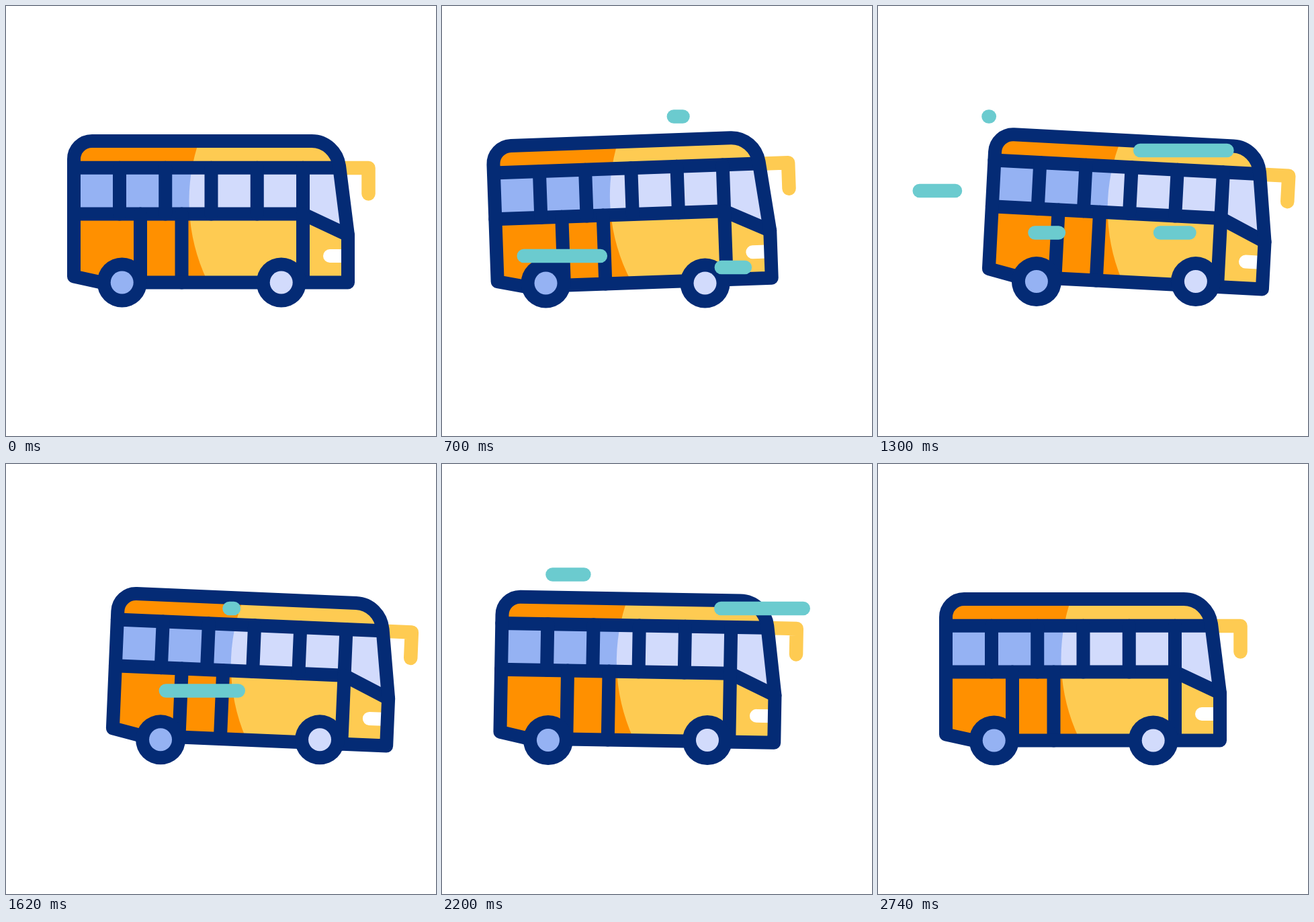
These frames come from a looping animation (640x640 px, 2.8 s). An HTML page with a canvas:

```html
<!DOCTYPE html>
<html lang="en">
<head>
<meta charset="utf-8">
<title>Bus</title>
<style>
  html, body { margin: 0; width: 100%; height: 100%; overflow: hidden; background: #fff; }
  canvas { display: block; width: 640px; height: 640px; }
</style>
</head>
<body>
<canvas id="stage" width="640" height="640"></canvas>
<script>
const ctx = document.getElementById('stage').getContext('2d');
const LOOP = 2800, REST = 200, STOP = 2740;
const NAVY = '#042b75', ORANGE = '#ff9000', YELLOW = '#fecb52';
const BLUE = '#95b2f3', PALE = '#d2dbfc', TEAL = '#6bcbcf';
const PIVOT = { x: 319, y: 411 };
const STREAK_TIME = 500, TAIL_LAG = 205;

// Eased progress from 0 to 1 between two times
function step(t, start, end) {
  const u = Math.min(1, Math.max(0, (t - start) / (end - start)));
  return u * u * (3 - 2 * u);
}

// Wind up, dash forward, roll back past the start, settle
function busShift(t) {
  const windUp = step(t, REST, 658) - step(t, 2321, STOP);
  const dash = step(t, 658, 1408) - step(t, 1425, 2321);
  return 87 * dash - 19 * windUp;
}

// Nose up, nose down, level, then a last small dip
function busTilt(t) {
  const noseUp = step(t, REST, 630) - step(t, 640, 880);
  const noseDown = step(t, 640, 880) - step(t, 1470, 2016);
  const dip = step(t, 2016, 2396) - step(t, 2396, STOP);
  return (3 * noseDown - 3 * noseUp + 2.1 * dip) * Math.PI / 180;
}

function line(color, width, ...points) {
  ctx.strokeStyle = color;
  ctx.lineWidth = width;
  ctx.beginPath();
  points.forEach(([x, y]) => ctx.lineTo(x, y));
  ctx.stroke();
}

function disc(x, y, r, color) {
  ctx.fillStyle = color;
  ctx.beginPath();
  ctx.arc(x, y, r, 0, Math.PI * 2);
  ctx.fill();
}

const body = new Path2D(
  'M101 402.5V228A27 27 0 0 1 128 201H455C476 201 493 217 496 238' +
  'L509 341V411.5H142Z');
const glass = new Path2D('M101 241H498L509 341L442 309.5H101Z');

// Shaded rear half, with a curved edge to the lit front half
function twoTone(path, shade, light) {
  ctx.save();
  ctx.clip(path);
  ctx.fillStyle = shade;
  ctx.fillRect(80, 180, 300, 260);
  disc(548, 290, 275.5, light);
  ctx.restore();
}

function drawBody() {
  const roof = 240.7, sill = 309.5, floor = 411.5;
  const bar = (...points) => line(NAVY, 20, ...points);
  const post = (x, top, bottom) => bar([x, top], [x, bottom]);

  line(YELLOW, 20.5, [505, 241], [539.5, 241], [539.5, 279.5]);
  twoTone(body, ORANGE, YELLOW);
  twoTone(glass, BLUE, PALE);
  line('#fff', 20, [482, 372], [503, 372]);

  bar([101, roof], [494, roof]);
  bar([101, sill], [442, sill], [509, 341]);
  for (let i = 0; i < 5; i++) post(169 + 68.25 * i, roof, sill);
  post(200, sill, floor);
  post(261.5, sill, floor);
  post(442, sill, floor);
  ctx.stroke(body);
}

function drawWheel(x, y, hub) {
  disc(x, y, 37, NAVY);
  disc(x, y, 17, hub);
}

function drawBus(t) {
  const tilt = busTilt(t);
  ctx.save();
  ctx.translate(busShift(t), 0);
  ctx.save();
  ctx.translate(PIVOT.x, PIVOT.y);
  ctx.rotate(tilt);
  ctx.translate(-PIVOT.x, -PIVOT.y);
  drawBody();
  ctx.restore();
  // The axles stay level and follow the tilt at their midpoint
  const wheelY = 411.5 - 27.5 * Math.sin(tilt);
  drawWheel(172.7, wheelY, BLUE);
  drawWheel(409.7, wheelY, PALE);
  ctx.restore();
}

// A speed line whose tail follows its head, once per start time
function streak(t, y, from, to, ...starts) {
  for (const start of starts) {
    const tailStart = start + TAIL_LAG;
    if (t <= start || t >= tailStart + STREAK_TIME) continue;
    const at = begin => from + (to - from) * step(t, begin, begin + STREAK_TIME);
    line(TEAL, 20.5, [at(tailStart), y], [at(start) - 0.01, y]);
  }
}

function draw(t) {
  ctx.fillStyle = '#fff';
  ctx.fillRect(0, 0, 640, 640);
  ctx.lineCap = ctx.lineJoin = 'round';
  drawBus(t);
  streak(t, 164.5, 358.5, 164.5, 620, 1656);
  streak(t, 215, 556.5, 332.5, 967, 1907);
  streak(t, 275, 148.5, 52.5, 897);
  streak(t, 337.5, 463.5, 233.5, 720, 1162);
  streak(t, 372, 258.5, 55.5, 392);
  streak(t, 389, 484.5, 413.5, 255);
}

const begin = performance.now();
function frame() {
  draw((performance.now() - begin) % LOOP);
  requestAnimationFrame(frame);
}
frame();
</script>
</body>
</html>
```
